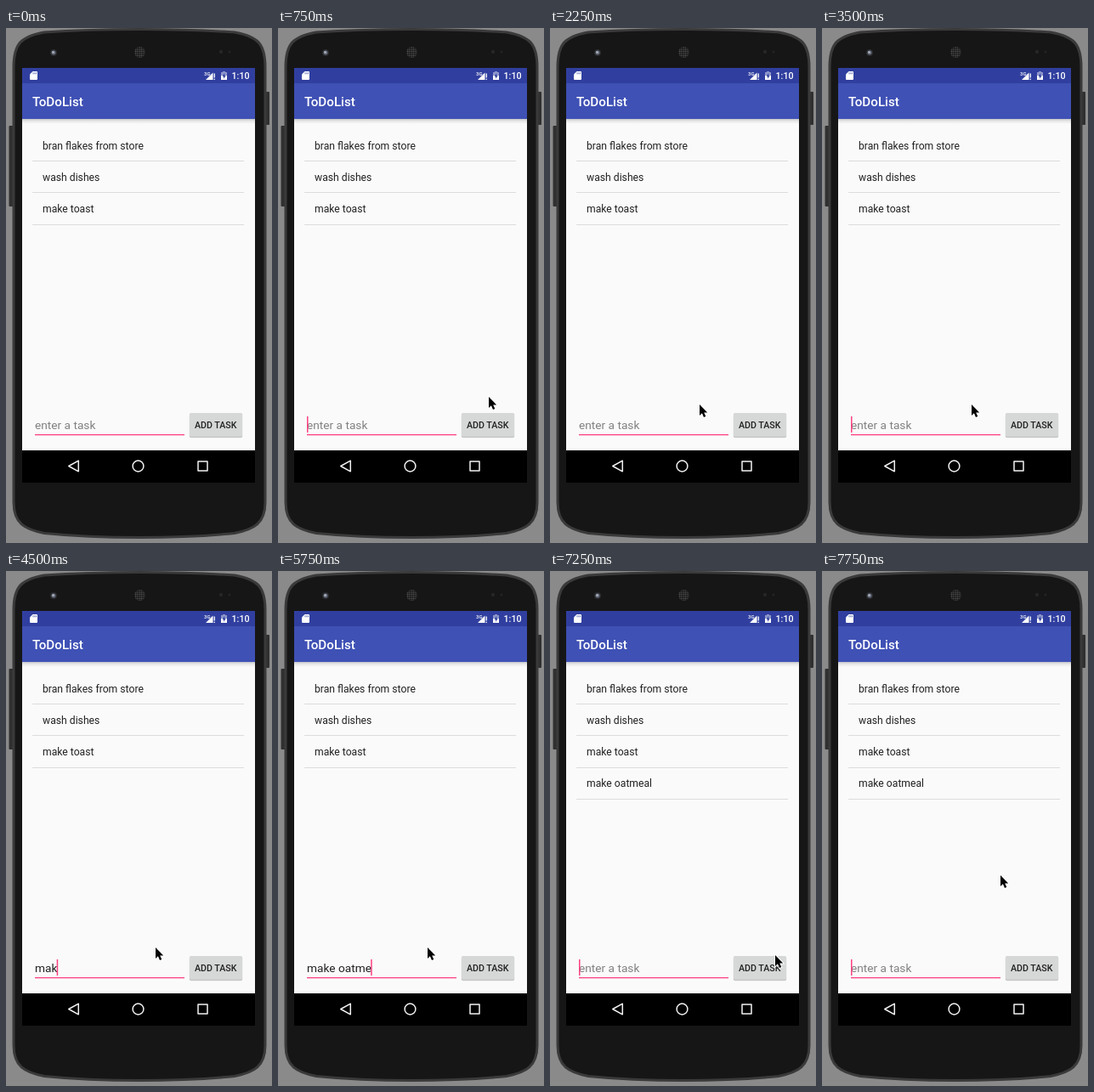
An HTML page that plays this animation: 313x606 px, repeating every 8000 ms.

```html
<!DOCTYPE html>
<html lang="en">
<head>
<meta charset="utf-8">
<title>ToDoList</title>
<style>
  html, body { margin: 0; width: 100%; height: 100%; overflow: hidden; background: #8a8a8a; }
  svg { display: block; width: 100%; height: 100%; }
  text { font-family: Roboto, "Noto Sans", sans-serif; }
  .item { font-size: 12.18px; fill: #212121; }
  .entry { font-size: 13.7px; }
  .medium { font-weight: 500; }
</style>
</head>
<body>
<svg viewBox="0 0 313 606" preserveAspectRatio="none">
  <defs>
    <linearGradient id="shade" x2="0" y2="1">
      <stop offset="0" stop-color="#c3c4c9"/>
      <stop offset=".4" stop-color="#e6e6e7"/>
      <stop offset="1" stop-color="#fafafa"/>
    </linearGradient>
    <pattern id="grill" width="2.4" height="2.4" patternUnits="userSpaceOnUse">
      <rect width="2.4" height="2.4" fill="#161616"/>
      <circle cx="1.2" cy="1.2" r=".8" fill="#5a5a5a"/>
    </pattern>
  </defs>

  <!-- phone -->
  <rect width="313" height="606" fill="#8a8a8a"/>
  <rect x="3.5" y="115" width="6" height="95" rx="1" fill="#303030"/>
  <rect x="304" y="75" width="6" height="39" rx="1" fill="#303030"/>
  <path fill="#161616" stroke="#3a3a3a" stroke-width="3"
    d="M9 46C9 18 18 10 45 5Q95 1.500 157 1.500T269 5C296 10 305 18 305 46V558C305 583 292 590 269 594.500Q219 599.500 157 599.500T45 594.500C22 590 9 583 9 558Z"/>
  <circle cx="56" cy="29" r="4" fill="#2b2c30"/>
  <circle cx="56" cy="29" r="2.500" fill="#666c7a"/>
  <circle cx="55.500" cy="28.500" r="1.200" fill="#b9bdc8"/>
  <circle cx="157.500" cy="28.500" r="6.500" fill="url(#grill)"/>
  <circle cx="253" cy="28" r="2.200" fill="#262626"/>
  <circle cx="263" cy="28" r="1.500" fill="#242424"/>

  <!-- screen -->
  <rect x="19" y="47" width="274" height="488" fill="#000"/>
  <rect x="19" y="107" width="274" height="390" fill="#fafafa"/>
  <rect x="19" y="107" width="274" height="6" fill="url(#shade)"/>
  <rect x="19" y="47" width="274" height="18" fill="#303f9f"/>
  <rect x="19" y="65" width="274" height="42" fill="#3f51b5"/>
  <text x="31" y="92" class="medium" font-size="15.200" fill="#fff">ToDoList</text>

  <!-- status icons -->
  <path fill="#fff" d="M31.500 51H36Q37 51 37 52V60Q37 61 36 61H29Q28 61 28 60V54.500Z"/>
  <path stroke="#303f9f" stroke-width=".7" d="M32 52.300V54.300M33.800 52.300V54.300M35.500 52.300V54.300"/>
  <text x="233" y="55.500" class="medium" font-size="6" fill="#fff">3G</text>
  <path fill="#fff" d="M235 61L243.500 52.500V61ZM244.600 53.500H245.900V58.500H244.600ZM244.600 59.700H245.900V61H244.600Z"/>
  <path fill="#fff" opacity=".45" d="M255 51H258V52H260V56H253V52H255Z"/>
  <path fill="#fff" d="M253 56H260V61H253Z"/>
  <path fill="#303f9f" d="M257.200 53L254.600 57.300H256.200V60L258.600 55.900H257.200Z"/>
  <text x="265.500" y="60" class="medium" font-size="10.660" fill="#fff">1:10</text>

  <g id="list"></g>

  <!-- entry row -->
  <text id="entry" class="entry" x="34" y="471.800"></text>
  <rect x="34" y="478" width="176" height="1.300" fill="#ff4081"/>
  <rect id="caret" y="457" width="1.500" height="19" fill="#ff4081"/>
  <rect x="215.700" y="454" width="62.600" height="28.300" rx="2" fill="#000" opacity=".13"/>
  <rect x="216" y="453.700" width="62" height="28" rx="1.500" fill="#000" opacity=".13"/>
  <rect x="216" y="453" width="62" height="27.700" rx="1.500" fill="#d6d7d7"/>
  <text x="222" y="471" class="medium" font-size="10.660" fill="#212121">ADD TASK</text>

  <!-- navigation -->
  <g fill="none" stroke="#f2f2f2" stroke-width="1.500" stroke-linejoin="round">
    <path d="M73.800 515.500L85.300 509.200V521.800Z"/>
    <circle cx="155.500" cy="515.500" r="6.400"/>
    <rect x="226" y="510" width="11" height="11"/>
  </g>

  <path id="pointer" d="M0 0V13L2.900 10.300L5 15L7.300 14L5.200 9.400H9.200Z"
    stroke="#fff" stroke-width="2" paint-order="stroke"/>
</svg>
<script>
const LOOP = 8000, STEP = 250, ADDED = 7250;
const LEFT = 34;
const tasks = ["bran flakes from store", "wash dishes", "make toast", "make oatmeal"];

// [time, x, y]
const moves = [
  [500, 287, 424], [750, 248, 434], [1000, 196, 456], [1250, 167, 470],
  [1750, 169, 463], [2000, 173, 450], [2250, 176, 443],
  [6750, 265, 452], [7500, 240, 406], [7750, 210, 358]
];
// [time, text]
const typing = [
  [0, ""], [4000, "m"], [4250, "ma"], [4500, "mak"], [4750, "make o"],
  [5000, "make otme"], [5250, "make o"], [5500, "make oat"],
  [5750, "make oatme"], [6000, "make oatmea"], [6250, "make oatmeal"], [ADDED, ""]
];
// [time, visible]
const blinks = [
  [0, 0], [500, 1], [1000, 0], [1500, 1], [2000, 0], [2500, 1], [3000, 0],
  [3500, 1], [6750, 0], [ADDED, 1]
];

const el = id => document.getElementById(id);
const [list, entry, caret, pointer] = ["list", "entry", "caret", "pointer"].map(el);
const at = (table, t) => table.filter(row => row[0] <= t).pop();
const show = (node, on) => node.setAttribute("visibility", on ? "visible" : "hidden");

list.innerHTML = tasks.map((task, i) => {
  const y = i * 37.3;
  return `<g><text class="item" x="43" y="${142.5 + y}">${task}</text>
    <rect x="31" y="${Math.round(156 + y)}" width="249" height="1" fill="#dcdcdc"/></g>`;
}).join("");

let last = -1;
function draw(t) {
  if (t === last) return;
  last = t;
  const text = at(typing, t)[1];
  entry.textContent = text || "enter a task";
  entry.setAttribute("fill", text ? "#212121" : "#808080");
  caret.setAttribute("x", LEFT + (text ? entry.getComputedTextLength() - 0.7 : 0));
  show(caret, at(blinks, t)[1]);
  show(list.lastElementChild, t >= ADDED);
  const move = at(moves, t);
  show(pointer, move);
  if (move) pointer.setAttribute("transform", `translate(${move[1]} ${move[2]})`);
}

const start = performance.now();
function tick(now) {
  const t = Math.max(0, now - start) % LOOP;
  draw(Math.floor(t / STEP) * STEP);
  requestAnimationFrame(tick);
}
draw(0);
requestAnimationFrame(tick);
</script>
</body>
</html>
```
